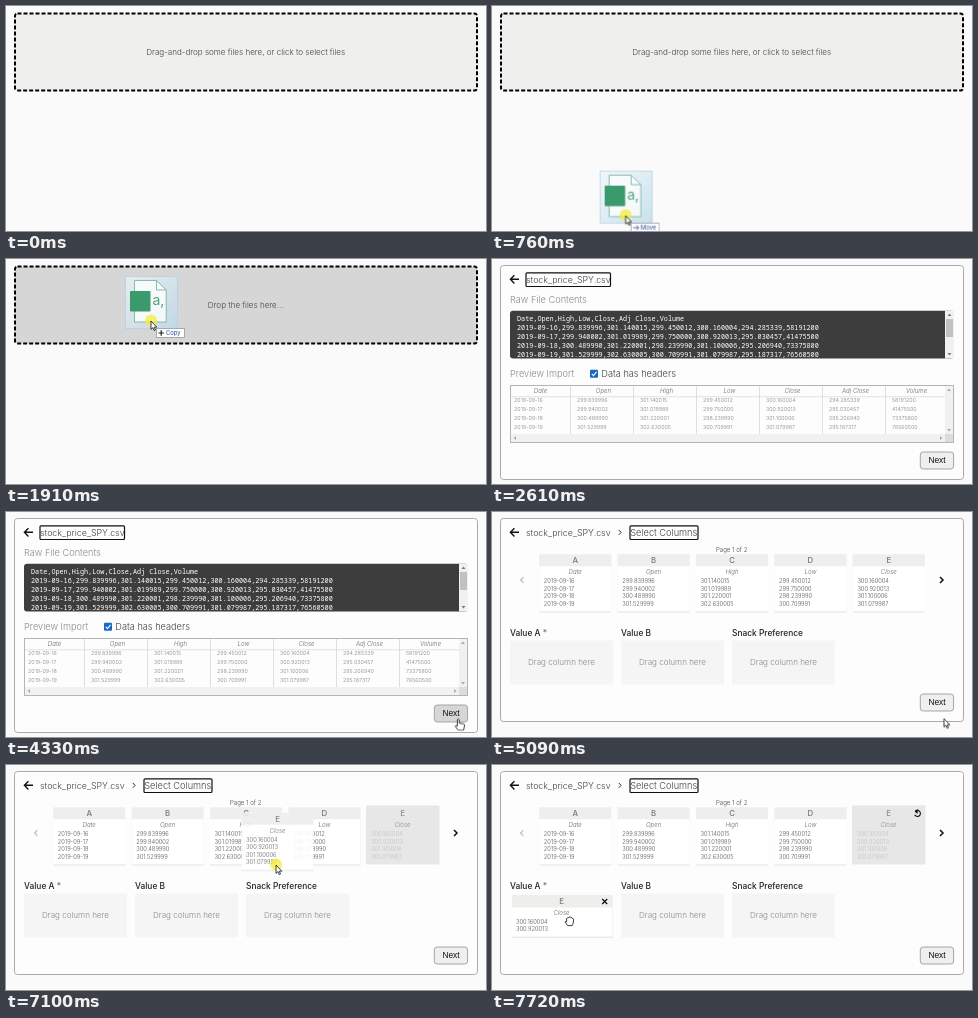
Animation of 480 by 225 pixels, one loop 8000 ms. Source, as an HTML page:

```html
<!DOCTYPE html>
<html lang="en">
<head>
<meta charset="utf-8">
<title>CSV import</title>
<style>
html, body { margin: 0; width: 100%; height: 100%; overflow: hidden; background: #fafafa; }
svg { display: block; width: 100vw; height: 100vh; }
text { font-family: Inter, "Open Sans", sans-serif; font-weight: 300; fill: #444; white-space: pre; }
.mid { text-anchor: middle; }
.body { font-size: 8.05px; }
.title { font-size: 9.2px; }
.file { font-size: 8.85px; }
.muted { fill: #8a8a8a; }
.cell { font-size: 5.4px; fill: #808080; }
.value { font-size: 5.75px; fill: #555; }
.name { font-size: 6.1px; font-style: italic; fill: #666; }
.mono { font-family: "Noto Sans Mono", "DejaVu Sans Mono", monospace; font-weight: 500; font-size: 6.8px; fill: #fff; }
.btn { font-family: "Liberation Sans", Arial, sans-serif; font-weight: 400; font-size: 8.4px; fill: #111; }
.letter { font-size: 7.8px; font-weight: 500; fill: #777; }
.label { font-size: 8.4px; font-weight: 500; fill: #222; }
.tip { font-size: 5.9px; font-weight: 400; fill: #2a4a9a; }
.line { fill: none; stroke: #111; }

.anim { animation: 8s step-end infinite; }
#drop { animation-name: drop; }
#preview { animation-name: preview; }
#columns { animation-name: columns; }
.idle { animation-name: idle; }
.over { animation-name: over; }
#pointer { animation-name: pointer; }
#file { animation-name: file; }
#disc { animation-name: disc; }
#arrow { animation-name: arrow; }
#hand { animation-name: hand; }
#grab, #placed, #undo { animation-name: placed; }
#hover { animation-name: hover; }
#lifted { animation-name: lifted; }
#source { animation-name: source; }
#slot { animation-name: slot; }

@keyframes drop { 0% { opacity: 1 } 31.75%, 100% { opacity: 0 } }
@keyframes preview { 0% { opacity: 0 } 31.75% { opacity: .6 } 32.625% { opacity: 1 } 61.75%, 100% { opacity: 0 } }
@keyframes columns { 0% { opacity: 0 } 61.75% { opacity: .6 } 62.69%, 100% { opacity: 1 } }
@keyframes idle { 0% { opacity: 1 } 18.125%, 100% { opacity: 0 } }
@keyframes over { 0% { opacity: 0 } 18.125%, 100% { opacity: 1 } }
@keyframes file { 0% { opacity: 1 } 31.75%, 100% { opacity: 0 } }
@keyframes disc { 0% { opacity: 1 } 31.75% { opacity: 0 } 82.125% { opacity: 1 } 95.5%, 100% { opacity: 0 } }
@keyframes arrow { 0% { opacity: 1 } 47.18% { opacity: 0 } 61.75% { opacity: 1 } 95.5%, 100% { opacity: 0 } }
@keyframes hand { 0% { opacity: 0 } 47.18% { opacity: 1 } 61.75%, 100% { opacity: 0 } }
@keyframes hover { 0% { fill: #efefef } 47.18%, 100% { fill: #d6d6d6 } }
@keyframes lifted { 0% { opacity: 0 } 82.125% { opacity: .9 } 95.5%, 100% { opacity: 0 } }
@keyframes source { 0% { opacity: 1 } 82.125%, 100% { opacity: 0 } }
@keyframes slot { 0% { opacity: 0 } 82.125%, 100% { opacity: 1 } }
@keyframes placed { 0% { opacity: 0 } 95.5%, 100% { opacity: 1 } }
@keyframes pointer {
  0% { opacity: 0; transform: translate(130px, 250px) }
  6.625% { opacity: 1; transform: translate(130px, 250px); animation-timing-function: steps(9) }
  15.25% { opacity: 1; transform: translate(141px, 129px) }
  16.25% { transform: translate(141px, 112px) }
  17.125% { transform: translate(142px, 92px) }
  18.125% { transform: translate(143px, 82px); animation-timing-function: steps(4) }
  22% { transform: translate(145px, 64px) }
  23.875% { opacity: 1; transform: translate(145px, 62px) }
  31.75% { opacity: 0; transform: translate(145px, 62px) }
  38.625% { opacity: 1; transform: translate(150px, 64px); animation-timing-function: steps(3) }
  41.5% { transform: translate(225px, 95px); animation-timing-function: steps(4) }
  45.3% { transform: translate(410px, 180px); animation-timing-function: steps(3) }
  48.125% { transform: translate(452px, 210px) }
  49.125% { transform: translate(452px, 209px); animation-timing-function: steps(3) }
  52% { transform: translate(452px, 208px) }
  54.125% { transform: translate(452px, 206.6px) }
  76.25% { transform: translate(447px, 200px); animation-timing-function: steps(3) }
  79.1875% { transform: translate(415px, 120px); animation-timing-function: steps(3) }
  82.125% { transform: translate(396px, 80px) }
  84% { transform: translate(391px, 79px); animation-timing-function: steps(4) }
  87.85% { transform: translate(270px, 100px); animation-timing-function: steps(4) }
  91.7% { transform: translate(110px, 142px); animation-timing-function: steps(2) }
  93.625%, 100% { opacity: 1; transform: translate(77px, 152px) }
}
</style>
</head>
<body>
<svg id="stage" viewBox="0 0 480 225" preserveAspectRatio="none">
  <defs>
    <linearGradient id="glass" x1="0" y1="0" x2="1" y2="1">
      <stop offset="0" stop-color="#eef5fa" stop-opacity=".7"/>
      <stop offset="1" stop-color="#b9d8ea" stop-opacity=".75"/>
    </linearGradient>
  </defs>
</svg>
<script>
const text = (x, y, cls, str, extra = '') => `<text x="${x}" y="${y}" class="${cls}" ${extra}>${str}</text>`;
const rect = (x, y, w, h, fill, extra = '') => `<rect x="${x}" y="${y}" width="${w}" height="${h}" fill="${fill}" ${extra}/>`;
const line = (d, width = 1, extra = '') => `<path class="line" d="${d}" stroke-width="${width}" ${extra}/>`;
const tri = (d, fill = '#777') => `<path d="${d}" fill="${fill}"/>`;
const group = (id, body, cls = 'anim') => `<g id="${id}" class="${cls}">${body}</g>`;

const names = ['Date', 'Open', 'High', 'Low', 'Close', 'Adj Close', 'Volume'];
const rows = [
  '2019-09-16,299.839996,301.140015,299.450012,300.160004,294.285339,58191200',
  '2019-09-17,299.940002,301.019989,299.750000,300.920013,295.030457,41475500',
  '2019-09-18,300.489990,301.220001,298.239990,301.100006,295.206940,73375800',
  '2019-09-19,301.529999,302.630005,300.709991,301.079987,295.187317,76560500'
];
const data = rows.map(r => r.split(','));

const panel = h => rect(8.5, 6.5, 463, h, '#fdfdfd', 'rx="3" stroke="#aaa"');
const focus = (x, w) => rect(x, 13.8, w, 13.7, 'none', 'rx="1" stroke="#111" stroke-width="1.2"');
const back = line('M27 20.3H18.6M22.4 16.2L18.4 20.3L22.4 24.4', 1.4);
const fileName = text(34, 23.5, 'file', 'stock_price_SPY.csv');
const button = (y, id) => rect(428.3, y, 33.3, 17, '#efefef', `rx="3" stroke="#a5a5a5" ${id ? `id="${id}" class="anim"` : ''}`)
  + text(445, y + 11.3, 'btn mid', 'Next');

function dropZone() {
  const box = (fill, cls) => rect(9, 7.6, 462, 77, fill, `rx="2.5" class="anim ${cls}"`);
  return box('#efefed', 'idle') + box('#d6d6d6', 'over')
    + rect(9, 7.6, 462, 77, 'none', 'rx="2.5" stroke="#000" stroke-width="2" stroke-dasharray="4 2"')
    + text(239.7, 48.6, 'body mid anim idle', 'Drag-and-drop some files here, or click to select files')
    + text(239.7, 48.6, 'body mid anim over', 'Drop the files here...');
}

function rawPanel() {
  return rect(18, 51.7, 444, 47.8, '#3d3d3d', 'rx="3"')
    + rect(453, 51.7, 9, 47.8, '#f1f1f1') + rect(454, 60, 7, 18, '#c1c1c1')
    + tri('M455.5 57h4l-2-2.4z') + tri('M455.5 94h4l-2 2.4z')
    + [names.join(','), ...rows].map((r, i) => text(25, 62 + i * 9, 'mono', r)).join('');
}

function table() {
  const cols = names.map((n, c) => {
    const x = 22 + c * 63;
    return text(c < 6 ? x + 26.5 : 424.5, 134, 'name mid', n)
      + data.map((r, i) => text(x, 143.4 + i * 9, 'cell', r[c])).join('')
      + (c ? line(`M${x - 6.5} 127V175`, .6, 'style="stroke:#ccc"') : '');
  }).join('');
  return rect(18.5, 126.5, 443, 57, '#fdfdfd') + cols
    + line('M19 137.8H453', .6, 'style="stroke:#ccc"')
    + rect(453, 127, 8, 48, '#f1f1f1') + rect(19, 175, 434, 8, '#f1f1f1') + rect(453, 175, 8, 8, '#dcdcdc')
    + tri('M455 132h4l-2-2.4z', '#aaa') + tri('M455 170h4l-2 2.4z', '#aaa')
    + tri('M24 177v4l-2.4-2z', '#aaa') + tri('M448 177v4l2.4-2z', '#aaa')
    + rect(18.5, 126.5, 443, 57, 'none', 'stroke="#b5b5b5"');
}

function preview() {
  return panel(214) + back + fileName + focus(34, 84.5)
    + text(18, 43.8, 'title muted', 'Raw File Contents') + rawPanel()
    + text(18, 118.3, 'title muted', 'Preview Import')
    + rect(98, 110.8, 8, 8, '#1769c4', 'rx="1"') + line('M99.8 114.8l1.7 1.8 3-3.8', 1.1, 'style="stroke:#fff"')
    + text(109.3, 118.3, 'title', 'Data has headers') + table() + button(193, 'hover');
}

// Column card with its top left corner at x, y
function card(c, x, y) {
  return rect(x, y + 1, 72, 57.5, '#000', 'opacity=".07" rx="1"') + rect(x, y, 72, 57, '#fff', 'rx="1"')
    + rect(x, y, 72, 12, '#eeeeec')
    + text(x + 36, y + 9, 'letter mid', 'ABCDE'[c]) + text(x + 36, y + 20, 'name mid', names[c])
    + data.map((r, i) => text(x + 4.6, y + 29 + i * 7.5, 'value', r[c])).join('');
}

function slot() {
  return rect(360, 40.5, 73.5, 59, '#e7e7e7', 'rx="1"')
    + text(396.5, 51.3, 'letter mid', 'E', 'opacity=".8"') + text(396.5, 62, 'name mid', 'Close', 'opacity=".75"')
    + data.map((r, i) => text(365, 71 + i * 7.5, 'value', r[4], 'opacity=".25"')).join('');
}

function field(x, label) {
  return text(x, 123.6, 'label', label) + rect(x, 128.5, 103, 44, '#f5f5f5', 'rx="1"')
    + text(x + 51.5, 153, 'body mid muted', 'Drag column here');
}

function placed() {
  return rect(18, 128.5, 103, 44, '#fdfdfd') + rect(20, 131, 101, 42, '#000', 'opacity=".07" rx="1"')
    + rect(20, 130, 100.5, 41.5, '#fff', 'rx="1"') + rect(20, 130, 100.5, 12.5, '#eeeeec')
    + text(69.5, 139.3, 'letter mid', 'E') + line('M110.2 134l5 5M115.2 134l-5 5', 1.3)
    + text(69.5, 150.2, 'name mid', 'Close')
    + [0, 1].map(i => text(24, 158.7 + i * 7.6, 'value', data[i][4])).join('');
}

function columns() {
  return panel(203) + back + fileName + line('M126.8 18l2.3 2.4-2.3 2.4', .9) + focus(138, 68)
    + text(138.3, 23.5, 'title', 'Select Columns')
    + text(239.7, 39.7, 'mid', 'Page 1 of 2', 'font-size="6.1"')
    + line('M31.4 65.2l-2.8 2.8 2.8 2.8', 1.2, 'style="stroke:#bbb"') + line('M448 65l3 3-3 3', 1.5)
    + [0, 1, 2, 3].map(c => card(c, 47.2 + c * 78.4, 42.3)).join('')
    + group('source', card(4, 360.8, 42.3)) + group('slot', slot())
    + group('undo', line('M423.2 46.4a3 3 0 1 1-.5 3.3', 1.1) + tri('M422.6 46.6l3-2.6v5z', '#111'))
    + field(18, 'Value A <tspan fill="#66a">*</tspan>') + field(129, 'Value B') + field(240, 'Snack Preference')
    + group('placed', placed()) + button(182);
}

function file() {
  const tag = rect(5.5, 7.5, 28, 9, '#fff', 'stroke="#999" stroke-width=".8"');
  return rect(-25.5, -44.5, 52, 52, 'url(#glass)', 'stroke="#b4cfde" stroke-width=".7"')
    + '<path d="M-16.5-40.5H5.5L15.2-31V1H-16.5Z" fill="#fcfdfd" fill-opacity=".85" stroke="#6fae96" stroke-width=".8"/>'
    + line('M5.5-40.5V-31H15.2', .8, 'style="stroke:#6fae96"')
    + rect(-21, -30, 20.5, 20.5, '#3a9a6c', 'rx="1"')
    + text(1.4, -16.5, '', 'a,', 'font-size="14" style="fill:#4da37f;font-weight:400"')
    + tag
    + `<g class="anim idle">${line('M7.5 12h5.5M10.8 9.7l2.3 2.3-2.3 2.3', .8, 'style="stroke:#2a4a9a"')}${text(15, 14.1, 'tip', 'Move')}</g>`
    + `<g class="anim over">${line('M7.5 12h5.4M10.2 9.3v5.4', 1.2, 'style="stroke:#222"')}${text(15, 14.1, 'tip', 'Copy')}</g>`;
}

function pointer() {
  const glyph = (id, d) => `<path id="${id}" class="anim" d="${d}" fill="#fff" stroke="#111" stroke-width=".8" stroke-linejoin="round"/>`;
  return group('lifted', card(4, -34.5, -52.3)) + group('file', file())
    + '<circle id="disc" class="anim" r="6" cy="-.5" fill="#f4ec3c" fill-opacity=".75"/>'
    + glyph('arrow', 'M0 0V8.4L1.9 6.7 3.2 9.6 4.5 9 3.2 6.2H5.8Z')
    + glyph('hand', 'M-.6 1Q.4-.2 1.2 1V4.4L5.6 5.3Q6.7 5.6 6.5 7L5.6 11.5H.2L-2.8 7.6Q-2.6 6.2-.6 7.4Z')
    + glyph('grab', 'M-2.4 1.4Q-1.6.2-.8 1.2Q0-.4 1-.1Q1.8-.2 2 .8Q3.2.2 3.5 1.6Q4.6 1.5 4.6 2.8L4.2 6.2 3.2 8.6H-1.4L-4 5Q-3.8 3.8-2.4 4.8Z');
}

document.getElementById('stage').insertAdjacentHTML('beforeend',
  group('drop', dropZone()) + group('preview', preview()) + group('columns', columns()) + group('pointer', pointer()));
</script>
</body>
</html>
```
